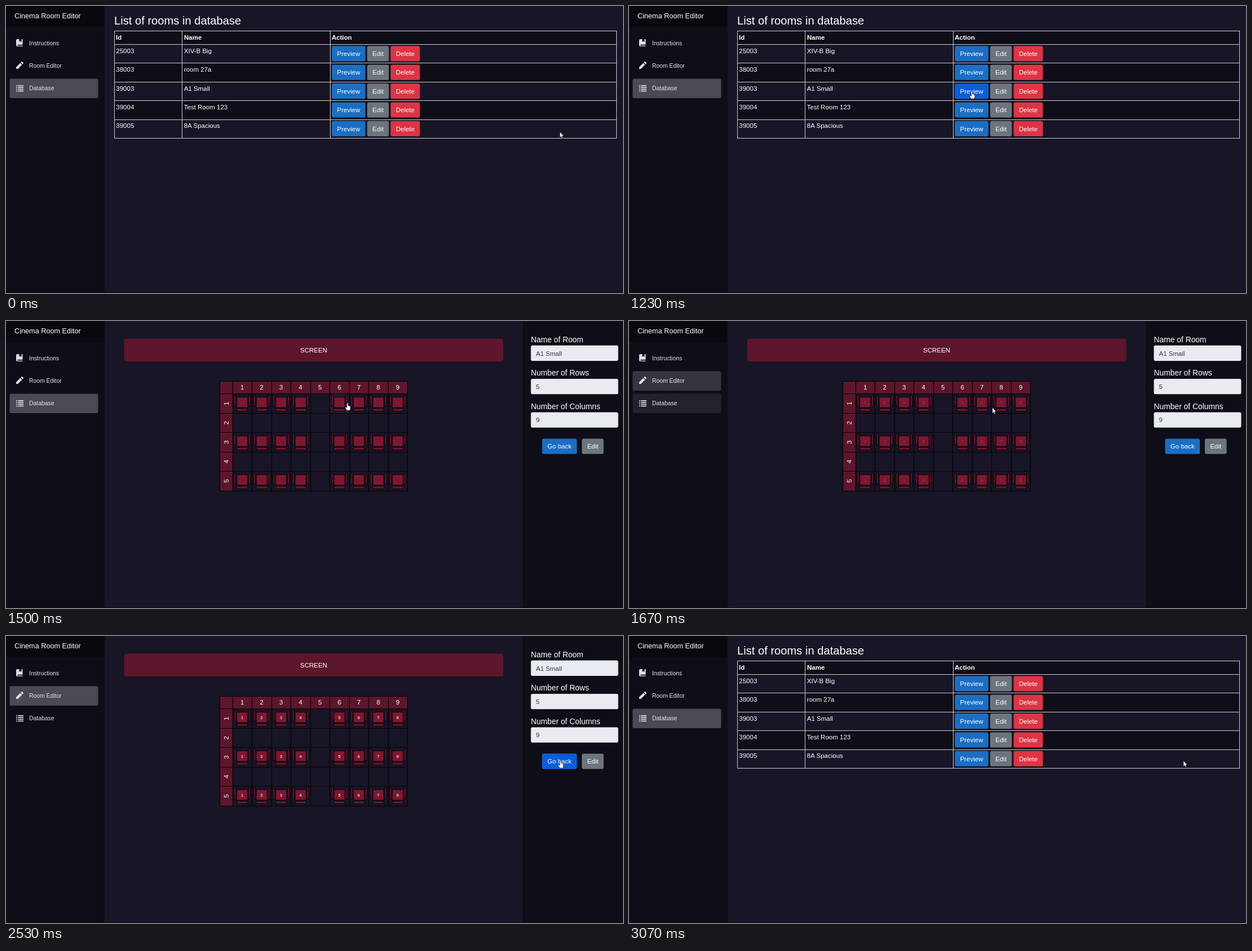
Write an HTML page that moves like this. It is 1095 by 511 pixels and loops after 3210 ms.

```html
<!DOCTYPE html>
<html lang="en">
<head>
<meta charset="utf-8">
<title>Cinema Room Editor</title>
<style>
  html, body { margin: 0; width: 100%; height: 100%; overflow: hidden; background: #181526; }
  svg { display: block; width: 1095px; height: 511px; font: 11.52px "Liberation Sans", Arial, sans-serif; }
  text { fill: #fff; white-space: pre; }
  .mid { text-anchor: middle; }
  .bold { font-weight: bold; }
  .field { fill: #343a40; }
  .seat-no { font-size: 7.6px; font-weight: bold; fill: #e8c9bd; text-anchor: middle; }
</style>
</head>
<body>
<svg id="stage" viewBox="0 0 1095 511"></svg>
<script>
const LOOP = 3210, OPEN = 1470, BACK = 2800;
const PANEL = '#0f0d18', WINE = '#5d162b', BLUE = '#1b6ec2', GREY = '#6c757d', RED = '#dc3545';

const rect = (x, y, w, h, fill, extra = '') =>
  `<rect x="${x}" y="${y}" width="${w}" height="${h}" fill="${fill}" ${extra}/>`;
const text = (x, y, label, extra = '') => `<text x="${x}" y="${y}" ${extra}>${label}</text>`;
const path = (d, extra = '') => `<path d="${d}" ${extra}/>`;
const group = (id, body, extra = '') => `<g id="${id}" ${extra}>${body}</g>`;
const range = n => [...Array(n).keys()];

function button(x, y, w, label, color, hoverId) {
  const box = (fill, extra = '') => rect(x, y, w, 27.2, fill, `rx="2.9" ${extra}`);
  const hover = hoverId ? box('#0b5ed7', `id="${hoverId}" opacity="0"`) : '';
  return box(color) + hover + text(x + w / 2, y + 17.8, label, 'class="mid"');
}

function sidebar() {
  const icons = [
    path('M20 59H29.5V68.8H20.6Q19.6 69.8 20.6 70.6H29.5V71.8H20Q18 71.8 18 69.8V61Q18 59 20 59Z') +
      path('M23.5 59H27.5V64L25.5 62.6 23.5 64Z', `fill="${PANEL}"`),
    path('M18 112V108.9L25.4 101.5 28.5 104.6 21.1 112ZM26.3 100.6L27.6 99.3Q28.3 98.8 29 99.3L30.7 101Q31.2 101.7 30.7 102.4L29.4 103.7Z'),
    range(4).map(i => rect(18, 141 + i * 3.2, 1.8, 1.7, '#e2e0e5') + rect(21.2, 141 + i * 3.2, 9.8, 1.7, '#e2e0e5')).join('')
  ];
  const items = ['Instructions', 'Room Editor', 'Database'].map((label, i) =>
    `<g fill="#e2e0e5">${icons[i]}</g>` +
    text(41, 69.7 + i * 40.3, label, 'font-size="10.4" style="fill:#e6e4e8"')).join('');
  return rect(0, 0, 175, 511, PANEL) + rect(0, 0, 175, 37.5, '#09080f') +
    text(15, 22, 'Cinema Room Editor', 'font-size="12.7"') +
    rect(6.5, 89.3, 157, 34.6, '#4c4953', 'rx="2.9" id="navEditor"') +
    rect(6.5, 129.5, 157, 34.6, '#4c4953', 'rx="2.9" id="navList"') + items;
}

function listScene() {
  const rooms = [[25003, 'XIV-B Big'], [38003, 'room 27a'], [39003, 'A1 Small'],
                 [39004, 'Test Room 123'], [39005, '8A Spacious']];
  const top = i => 68 + i * 33.4;
  let out = text(192, 33.4, 'List of rooms in database', 'font-size="20.16"');
  out += rect(192, 44, 891, 24, PANEL) + rect(192, top(1), 891, 33.4, PANEL) + rect(192, top(3), 891, 33.4, PANEL);
  const lines = [44, ...range(6).map(i => Math.round(top(i)))].map(y => `M192 ${y + .5}H1084`).join('') +
    [192, 312, 575, 1083].map(x => `M${x + .5} 44V236`).join('');
  out += path(lines, 'stroke="#cfcfd3" fill="none"');
  [['Id', 195], ['Name', 316], ['Action', 578]].forEach(([label, x]) => out += text(x, 60.3, label, 'class="bold"'));
  rooms.forEach(([id, name], i) => {
    const y = top(i);
    out += text(195.3, y + 15.8, id) + text(315.8, y + 15.8, name);
    if (i === 2) out += rect(576.8, y + 1.7, 62.4, 30, 'none', 'rx="4" stroke="#3184fd" stroke-opacity=".5" stroke-width="2.9" id="ring"');
    out += button(578.2, y + 3.2, 59.6, 'Preview', BLUE, i === 2 && 'previewHover') +
      button(641, y + 3.2, 38.4, 'Edit', GREY) + button(682.6, y + 3.2, 52, 'Delete', RED);
  });
  return out;
}

function seat(x, y) {
  const part = (dx, dy, w, h, fill) => rect(x + dx, y + dy, w, h, fill, 'stroke="#08060b"');
  return part(3, 3.2, 3, 19.3, '#6c142b') + part(28.6, 3.2, 3, 19.3, '#6c142b') +
    part(7.7, 6.2, 19.2, 18.4, '#7d1730') + part(7.7, 26.6, 19.2, 4.6, '#6c142b');
}

function roomScene() {
  const colX = i => 402 + i * 34.5, rowY = i => 129.5 + i * 34.5;
  let out = rect(209.7, 31.5, 672.8, 40.5, WINE, 'rx="4"') + text(546, 55.6, 'SCREEN', 'class="mid"');
  out += rect(379, 107, 333.7, 22.5, WINE) + rect(379, 107, 23, 195, WINE);
  out += rect(colX(5), rowY(0), 34.5, 34.5, '#1f1c34', 'id="cellHover"');
  const grid = [107, ...range(6).map(rowY)].map(y => `M379 ${Math.floor(y) + .5}H713`).join('') +
    [379, ...range(10).map(colX)].map(x => `M${Math.floor(x) + .5} 107V302.5`).join('');
  out += path(grid, 'stroke="#050408" stroke-width="1.2" fill="none"');
  range(9).forEach(i => out += text(colX(i) + 17.2, 122, i + 1, 'class="mid"'));
  let numbers = '';
  range(5).forEach(r => {
    out += text(0, 4.1, r + 1, `class="mid" transform="translate(390.5 ${rowY(r) + 17.3}) rotate(-90)"`);
    if (r % 2) return;
    range(9).filter(c => c !== 4).forEach(c => {
      out += seat(colX(c), rowY(r));
      numbers += text(colX(c) + 17.2, rowY(r) + 18.6, c < 4 ? c + 1 : c, 'class="seat-no"');
    });
  });
  out += group('numbers', numbers) + rect(917, 0, 178, 511, PANEL);
  [['Name of Room', 'A1 Small'], ['Number of Rows', 5], ['Number of Columns', 9]].forEach(([label, value], i) => {
    const y = i * 59.4;
    out += text(931.5, 38 + y, label, 'font-size="13.85"') +
      rect(931.5, 43.6 + y, 155, 27.3, '#e9ecef', 'rx="2.9"') + text(940.5, 61.5 + y, value, 'class="field"');
  });
  return out + button(951.5, 209.5, 61.6, 'Go back', BLUE, 'backHover') + button(1022, 209.5, 38.6, 'Edit', GREY);
}

const outline = 'fill="#fff" stroke="#15131c" stroke-width=".7" stroke-linejoin="round"';
const stage = document.getElementById('stage');
stage.innerHTML = sidebar() + group('list', listScene()) + group('room', roomScene()) +
  rect(0, 510, 1095, 1, '#0b0a11') +
  group('cursor',
    path('M0 0V10.4L2.3 8.3 3.8 11.6 5.3 10.9 3.9 7.7H7Z', `id="arrow" ${outline}`) +
    path('M-1.2 .8Q0 -.7 1.2 .8V4.6L2.6 4.8 5.2 5.9V9.2Q5.2 11 4.2 13.2H-1.2Q-2.8 10.6-4.1 8.2-3.8 6.8-2.4 7.4L-1.2 8.5Z', `id="hand" ${outline}`));

// Pointer stops: time, x, y
const stops = [[0, 983, 224], [400, 983, 224], [730, 701, 162], [900, 630, 152], [990, 652, 153],
  [1180, 608.5, 152], [1400, 608.5, 152], [1500, 606, 146], [1970, 786.5, 183], [2470, 983.5, 221.5],
  [2530, 984, 222], [LOOP, 984, 222]];

// Monotone cubic interpolation, so the pointer never overshoots a stop.
function track(t, axis) {
  const slope = i => stops[i + 1] && stops[i] ? (stops[i + 1][axis] - stops[i][axis]) / (stops[i + 1][0] - stops[i][0]) : 0;
  const tangent = i => {
    const a = slope(i - 1), b = slope(i);
    return a * b > 0 ? 2 * a * b / (a + b) : 0;
  };
  const i = Math.max(0, stops.findIndex(s => s[0] > t) - 1);
  const span = stops[i + 1][0] - stops[i][0], u = (t - stops[i][0]) / span, v = 1 - u;
  return stops[i][axis] * (1 + 2 * u) * v * v + stops[i + 1][axis] * u * u * (3 - 2 * u) +
    span * u * v * (tangent(i) * v - tangent(i + 1) * u);
}

const $ = id => document.getElementById(id);
const show = (id, on) => $(id).setAttribute('visibility', on ? 'visible' : 'hidden');
const fade = (id, value) => $(id).setAttribute('opacity', value);
const ramp = (t, start, length) => {
  const u = Math.min(1, Math.max(0, (t - start) / length));
  return u * u * (3 - 2 * u);
};

function draw(t) {
  const inRoom = t >= OPEN && t < BACK;
  const x = track(t, 1), y = track(t, 2);
  $('list').style.display = inRoom ? 'none' : '';
  $('room').style.display = inRoom ? '' : 'none';
  const editor = ramp(t, 1500, 280) - ramp(t, BACK - 20, 280);
  fade('navEditor', editor);
  fade('navList', 1 - editor);
  fade('previewHover', t < OPEN ? ramp(t, 1050, 150) : 0);
  fade('ring', t < OPEN ? ramp(t, 1360, 100) : 0);
  fade('backHover', ramp(t, 2390, 130));
  fade('cellHover', 1 - ramp(t, 1520, 60));
  fade('numbers', ramp(t, 1520, 600));
  const hand = inRoom ? t < 1550 || t > 2410 : x < 735 || (t >= BACK && t < BACK + 30);
  show('hand', hand);
  show('arrow', !hand);
  $('cursor').setAttribute('transform', `translate(${x.toFixed(2)} ${y.toFixed(2)})`);
}

const start = performance.now();
function tick() {
  draw((performance.now() - start) % LOOP);
  requestAnimationFrame(tick);
}
tick();
</script>
</body>
</html>
```
